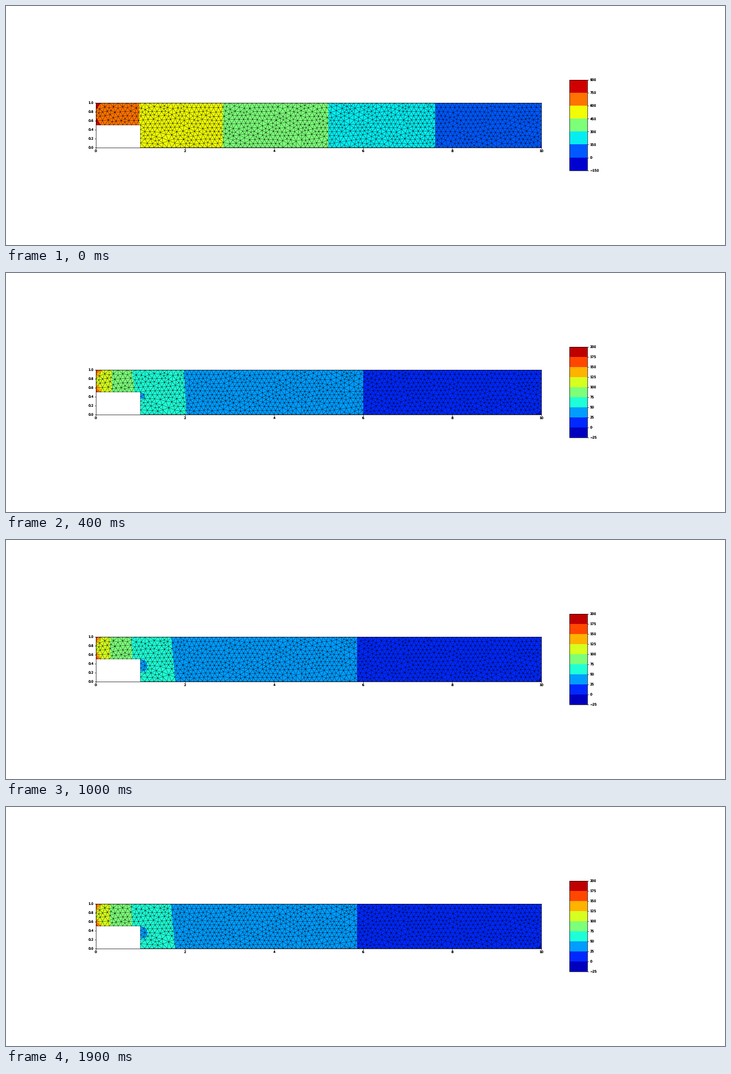
A matplotlib script that plays this animation: 1280x427 px, repeating every 2 s.

```python
import numpy as np
import matplotlib.pyplot as plt
from matplotlib.animation import FuncAnimation
from matplotlib.tri import Triangulation

W, H, DPI = 1280, 427, 64
PX = 72 / DPI  # points per pixel
FRAMES, INTERVAL = 20, 100
PLOT = (160, 173, 953, 252.6)  # left, top, right, bottom in pixels
BAR = (1003.2, 131.9, 1035.4, 293.6)
FONT_PX = 6
LABEL_GAP = 4.15
EDGE = 0.7 * PX
MESH_LINE = 0.4 * PX

plt.rcParams["font.family"] = "DejaVu Sans"
plt.rcParams["text.hinting"] = "none"
plt.rcParams["axes.linewidth"] = EDGE


def outline_points(spacing=0.1):
    corners = np.array([(0, 0.5), (1, 0.5), (1, 0), (10, 0), (10, 1), (0, 1)], float)
    parts = []
    for a, b in zip(corners, np.roll(corners, -1, axis=0)):
        count = round(np.hypot(*(b - a)) / spacing)
        parts.append(a + (b - a) * (np.arange(count) / count)[:, None])
    return np.vstack(parts)


def triangulate(points):
    mesh = Triangulation(points[:, 0], points[:, 1])
    cx, cy = points[mesh.triangles].mean(axis=1).T
    mesh.set_mask((cx < 1) & (cy < 0.5))
    return mesh


def build_mesh(h=0.102):
    rng = np.random.default_rng(4)
    border = outline_points()
    rows = np.arange(0, 1.1, h * 0.866)
    cols = np.arange(0, 10.2, h)
    x, y = np.meshgrid(cols, rows)
    x[1::2] += h / 2
    x = (x + rng.uniform(-0.38, 0.38, x.shape) * h).ravel()
    y = (y + rng.uniform(-0.38, 0.38, y.shape) * h).ravel()
    m = 0.6 * h
    inside = (x > m) & (x < 10 - m) & (y > m) & (y < 1 - m)
    inside &= (x > 1 + m) | (y > 0.5 + m)
    points = np.vstack([border, np.column_stack([x, y])[inside]])

    # Relax the interior nodes towards the mean of their neighbours.
    for _ in range(4):
        a, b = triangulate(points).edges.T
        total, degree = np.zeros_like(points), np.zeros(len(points))
        for i, j in ((a, b), (b, a)):
            np.add.at(total, i, points[j])
            np.add.at(degree, i, 1)
        k = len(border)
        points[k:] = total[k:] / np.maximum(degree[k:], 1)[:, None]
    return triangulate(points)


MESH = build_mesh()


def pressure(n):
    """Nodal pressure and contour levels at step n."""
    x, y = MESH.x, MESH.y
    settled, dip, dip_y = 0, 0, 0.4
    if n == 0:
        levels = np.arange(-150, 901, 150)
        xs = [0, 0.96, 2.835, 5.22, 7.61, 10]
        ps = [720, 600, 450, 300, 150, 0]
        spike, sink = 145, -5
    elif n == 1:
        levels = np.arange(-30, 211, 30)
        xs = [0, 0.25, 0.82, 1, 2.245, 6.125, 10]
        ps = [133, 120, 90, 69.6, 60, 30, 0]
        spike, sink, dip = 60, -8, 10.5
    else:
        levels = np.arange(-25, 201, 25)
        lag = 0.54 ** (n - 2)
        settled = 1 - lag
        x25, x50 = 5.853 + 0.477 * lag, 1.72 + 0.94 * lag
        x75, x100 = 0.808 + 0.15 * lag, 0.288 + 0.14 * lag
        xs = [0, x100, x75, 1, x50, x25, 10]
        ps = [100 + 48 * x100, 100, 75, 50 + 6.2 * (x50 - 1), 50, 25, 0]
        spike, sink = 68, -8
        dip, dip_y = 10 - 3 * lag, 0.34 + 0.2 * lag

    tilt = 0.1 * (y - 0.5) * np.exp(-(((x - 1.75) / 0.5) ** 2))
    tilt += 0.1 * (y - 0.75) * np.exp(-(((x - 0.8) / 0.2) ** 2))
    p = np.interp(x + settled * tilt, xs, ps) + 0.02
    eddy = np.exp(-(((x - 1) / 0.11) ** 2 + ((y - dip_y) / 0.135) ** 2) / 2)
    p -= dip * eddy * (x >= 1)
    for corner_y in (0.5, 1):
        p += spike * np.exp(-np.hypot(x, y - corner_y) / 0.08)
    p[np.hypot(x - 10, y) < 1e-6] = sink
    return p, levels


def add_axes(box):
    left, top, right, bottom = box
    return fig.add_axes([left / W, 1 - bottom / H, (right - left) / W, (bottom - top) / H])


def label(x, y, text, ha, va):
    # Repeated drawing gives the small digits their heavy look.
    for _ in range(3):
        fig.text(x / W, 1 - y / H, text, ha=ha, va=va, size=FONT_PX * PX)


def tick_style(axes):
    axes.tick_params(length=2.1 * PX, width=EDGE, labelbottom=False,
                     labelleft=False, labelright=False)


def update(n):
    fig.clear()
    p, levels = pressure(n)

    ax = add_axes(PLOT)
    filled = ax.tricontourf(MESH, p, levels=levels, cmap="jet")
    ax.triplot(MESH, "k-", lw=MESH_LINE)
    ax.set(xlim=(0, 10), ylim=(0, 1), xticks=range(0, 11, 2),
           yticks=np.linspace(0, 1, 6))
    tick_style(ax)
    left, top, right, bottom = PLOT
    for v in range(0, 11, 2):
        label(left + (right - left) * v / 10, bottom + LABEL_GAP, str(v), "center", "top")
    for v in np.linspace(0, 1, 6):
        label(left - LABEL_GAP, bottom - (bottom - top) * v, f"{v:.1f}",
              "right", "center_baseline")

    cax = add_axes(BAR)
    bar = fig.colorbar(filled, cax=cax, ticks=levels)
    bar.outline.set_linewidth(EDGE)
    tick_style(cax)
    _, top, right, bottom = BAR
    for v, y in zip(levels, np.linspace(bottom, top, len(levels))):
        label(right + LABEL_GAP, y, str(v).replace("-", "\u2212"),
              "left", "center_baseline")
    return []


fig = plt.figure(figsize=(W / DPI, H / DPI), dpi=DPI, facecolor="white")
anim = FuncAnimation(fig, update, frames=FRAMES, interval=INTERVAL, repeat=True)
plt.show()
```
